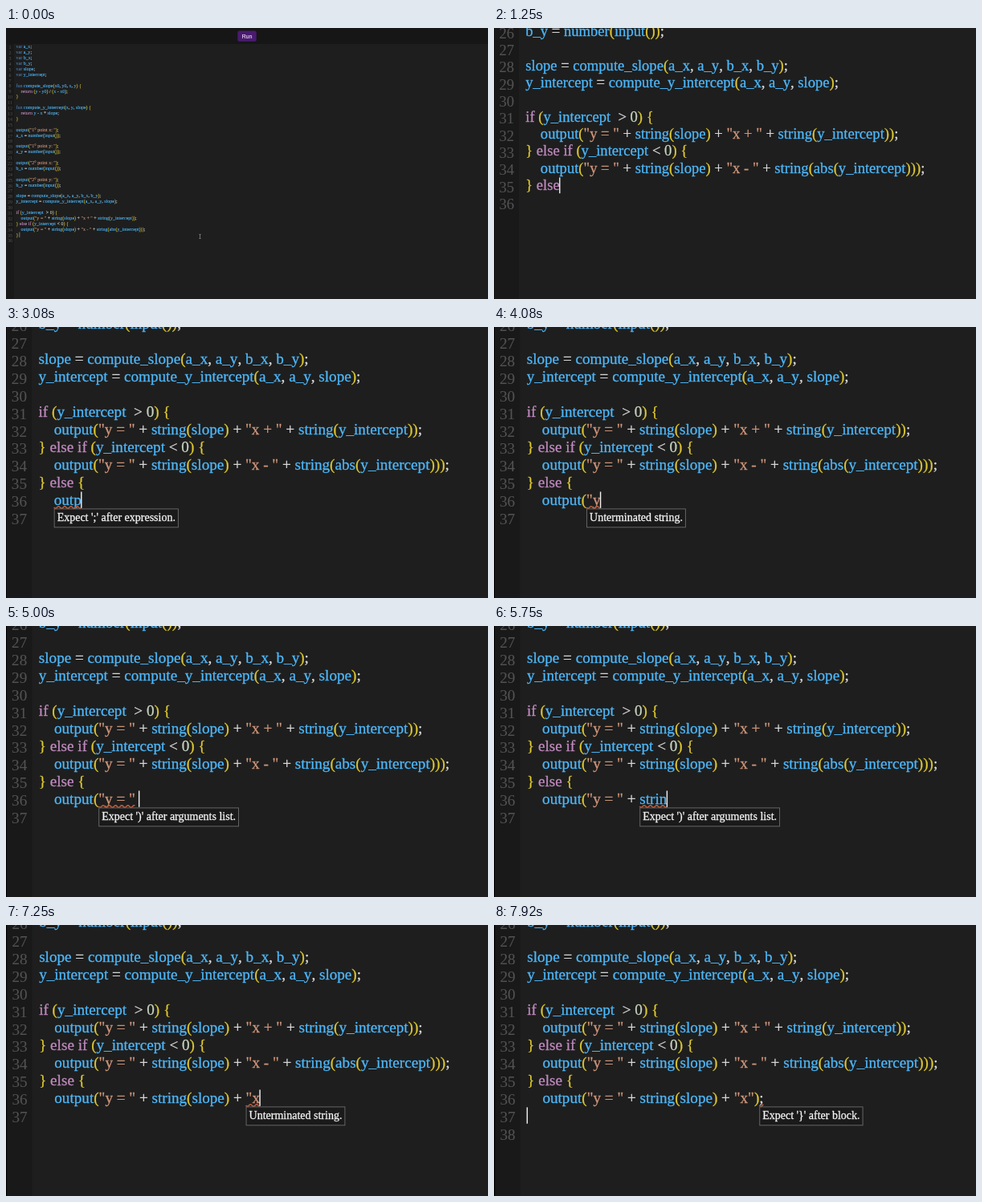
Write an HTML page with a canvas that moves like this. It is 600 px wide and 338 px high and loops after 8000 ms.

```html
<!DOCTYPE html>
<html lang="en">
<head>
<meta charset="utf-8">
<title>Code editor</title>
<style>
html, body { margin: 0; height: 100%; overflow: hidden; background: #000; }
canvas { display: block; }
</style>
</head>
<body>
<canvas id="stage" width="600" height="338"></canvas>
<script>
const ctx = document.getElementById('stage').getContext('2d');
const LOOP = 8000, SIZE = 6.02, LINE = 6.894, TOP = 20.2, LEFT = 12.5, ASCENT = 5.15;
const SERIF = '"Liberation Serif", "Times New Roman", serif';
const SANS = '"Liberation Sans", Arial, sans-serif';

const ask = (n, axis) => `output("${n}° point ${axis}: ");
${n === 1 ? 'a' : 'b'}_${axis} = number(input());

`;
const BASE = `var a_x;
var a_y;
var b_x;
var b_y;
var slope;
var y_intercept;

fun compute_slope(x0, y0, x, y) {
    return (y - y0) / (x - x0);
}

fun compute_y_intercept(x, y, slope) {
    return y - x * slope;
}

${ask(1, 'x')}${ask(1, 'y')}${ask(2, 'x')}${ask(2, 'y')}slope = compute_slope(a_x, a_y, b_x, b_y);
y_intercept = compute_y_intercept(a_x, a_y, slope);

if (y_intercept  > 0) {
    output("y = " + string(slope) + "x + " + string(y_intercept));
} else if (y_intercept < 0) {
    output("y = " + string(slope) + "x - " + string(abs(y_intercept)));
} `;
const TYPED = `else {
    output("y = " + string(slope) + "x");
`;
// Typing rhythm: [time in ms, characters typed]
const KEYS = [[0, 0], [600, 0], [1180, 4], [1300, 4], [2290, 10], [2400, 11], [2500, 11],
  [3040, 15], [3100, 15], [4950, 25], [5050, 25], [6450, 39], [6550, 39], [7500, 48], [7840, 49], [LOOP, 49]];

function typedCount(t) {
  const i = KEYS.findIndex(k => k[0] > t);
  const [t0, n0] = KEYS[i - 1], [t1, n1] = KEYS[i];
  return Math.floor(n0 + (n1 - n0) * (t - t0) / (t1 - t0));
}

const tokens = line => line.match(/"[^"]*"?|\w+|\s+|./g) || [];

function color(token) {
  if (token[0] === '"') return '#d0967a';
  if (/^(if|else|return)$/.test(token)) return '#c08abf';
  if (/^(var|fun)$/.test(token)) return '#447db5';
  if (/^\d/.test(token)) return '#c6d2be';
  if (/^\w/.test(token)) return '#4db8fa';
  return /[(){}]/.test(token) ? '#dec832' : '#dcdcdc';
}

// Large font scaled down, so that letter widths stay exact at every zoom
function setFont(size, family) {
  ctx.font = `${size * 10}px ${family}`;
}
const width = str => ctx.measureText(str).width / 10;
function text(str, x, y, fill, weight = 0.9) {
  ctx.save();
  ctx.translate(x, y);
  ctx.scale(0.1, 0.1);
  ctx.fillStyle = ctx.strokeStyle = fill;
  ctx.lineWidth = weight;
  ctx.lineJoin = 'round';
  ctx.fillText(str, 0, 0);
  ctx.strokeText(str, 0, 0);
  ctx.restore();
}
function rect(x, y, w, h, fill) {
  ctx.fillStyle = fill;
  ctx.fillRect(x, y, w, h);
}

function diagnose(line, token) {
  if (token === '}' || token === 'else') return null;
  if (token === '{' || token === ';') return "Expect '}' after block.";
  if (token === '(' || token === '+') return 'Expect expression.';
  if (/^"[^"]*$/.test(token)) return 'Unterminated string.';
  if (line.split('(').length > line.split(')').length) return "Expect ')' after arguments list.";
  return "Expect ';' after expression.";
}

function drawError(lines) {
  let row = lines.length - 1;
  while (!lines[row].trim()) row--;
  const line = lines[row].trimEnd(), token = tokens(line).pop();
  const message = diagnose(line, token);
  if (!message) return;

  setFont(SIZE, SERIF);
  const w = width(token);
  const x = LEFT + tokens(line).slice(0, -1).reduce((sum, s) => sum + width(s), 0);
  const y = TOP + row * LINE;
  ctx.strokeStyle = '#b85a3c';
  ctx.lineWidth = 0.5;
  ctx.beginPath();
  for (let d = 0; d <= w; d += 0.2) ctx.lineTo(x + d, y + ASCENT + 1.1 + 0.4 * Math.sin(d * 2.6));
  ctx.stroke();

  setFont(4.4, SERIF);
  const boxW = width(message) + 2.5, boxY = y + LINE - 0.2;
  rect(x, boxY, boxW, 7.5, '#686868');
  rect(x + 0.3, boxY + 0.3, boxW - 0.6, 6.9, '#1a1a1a');
  text(message, x + 1.25, boxY + 4.95, '#f4f4f4');
}

function drawPage(t) {
  rect(0, 0, 600, 338, '#1e1e1e');
  rect(0, 20, 9.8, 318, '#191919');
  rect(0, 0, 600, 20, '#161616');

  ctx.fillStyle = '#4a1a70';
  ctx.beginPath();
  ctx.roundRect(288.3, 3.5, 23.4, 13.2, 2);
  ctx.fill();
  setFont(7.2, SANS);
  text('Run', 300 - width('Run') / 2, 12.6, '#f0eaf4');

  const lines = (BASE + TYPED.slice(0, typedCount(t))).split('\n');
  setFont(SIZE, SERIF);
  let x;
  lines.forEach((line, i) => {
    x = LEFT;
    for (const s of tokens(line)) {
      text(s, x, TOP + i * LINE + ASCENT, color(s));
      x += width(s);
    }
  });
  for (let i = 0; i <= lines.length; i++) {
    const label = String(i + 1);
    text(label, 4.9 - width(label) / 2, TOP + i * LINE + ASCENT + 0.85, '#525252', 0.3);
  }
  drawError(lines);
  rect(x - 0.2, TOP + (lines.length - 1) * LINE + 0.1, 0.45, 6.4, '#f0f0f0');

  // Mouse pointer over text
  rect(241.2, 257.4, 0.6, 5, '#a8a8a8');
  rect(240.2, 257, 2.6, 0.5, '#a8a8a8');
  rect(240.2, 262.3, 2.6, 0.5, '#a8a8a8');
}

function frame(now) {
  const t = now % LOOP;
  const u = Math.max(0, t - 835) * 0.012;
  const p = 1 - (1 + u) * Math.exp(-u);
  const drift = 0.9 * Math.max(0, t - 1700) / 6300;
  const zoom = 1 + 2.18 * p;
  ctx.setTransform(1, 0, 0, 1, 0, 0);
  rect(0, 0, 600, 338, '#000');
  ctx.setTransform(zoom, 0, 0, zoom, 0.6 * p + drift, -626.4 * p);
  drawPage(t);
  requestAnimationFrame(frame);
}
requestAnimationFrame(frame);
</script>
</body>
</html>
```
